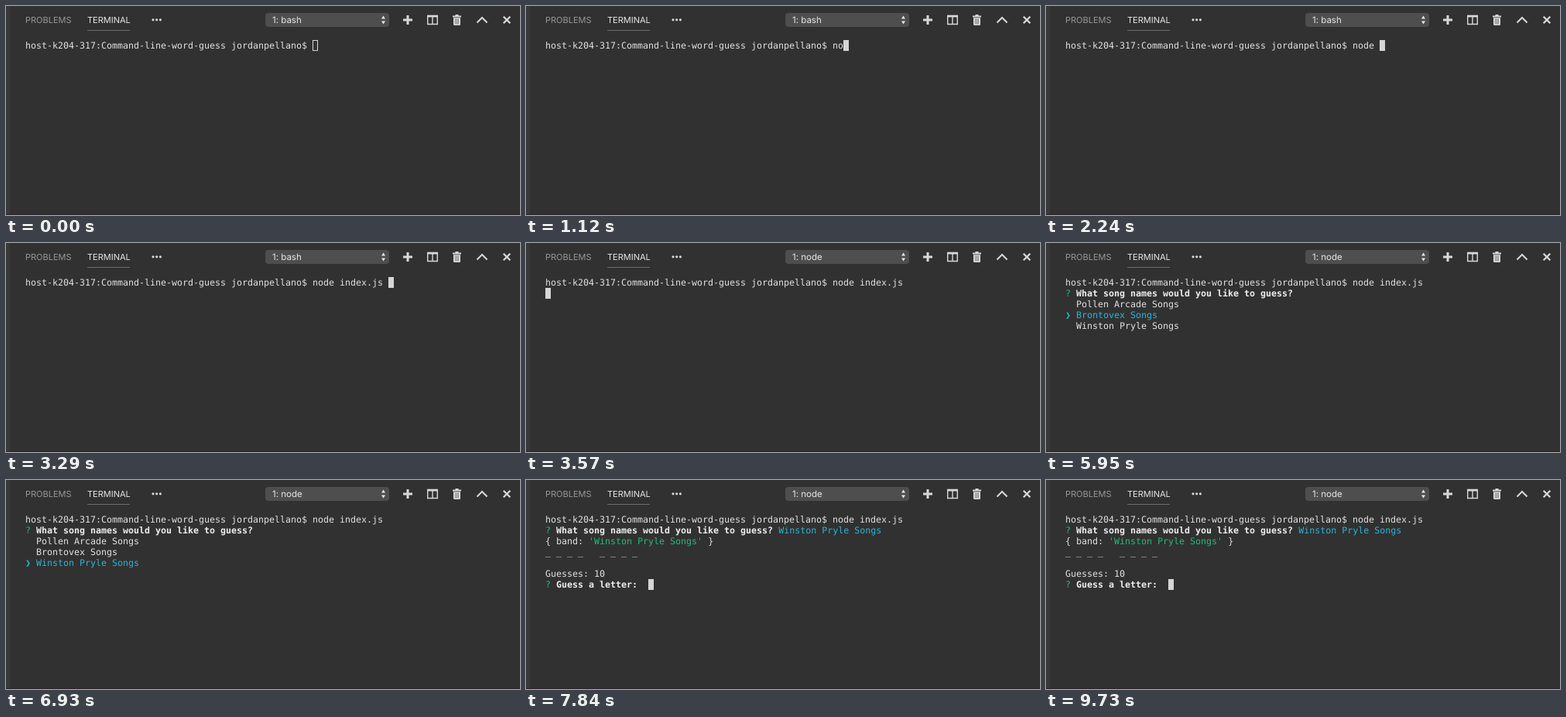
An HTML page that plays this animation: 664x270 px, repeating every 9870 ms.

```html
<!DOCTYPE html>
<html lang="en">
<head>
<meta charset="utf-8">
<title>Terminal word guess</title>
<style>
  html, body { margin: 0; width: 100%; height: 100%; overflow: hidden; background: #313131; }
  svg { display: block; }
  text { white-space: pre; text-rendering: geometricPrecision; }
  .ui { font: 11px Inter, sans-serif; fill: #e7e7e7; }
  #shell { font-size: 11.5px; }
  #term { font: 11.64px "DejaVu Sans Mono", monospace; }
  .icon { fill: none; stroke: #d8d8d8; stroke-width: 2; }
</style>
</head>
<body>
<svg width="664" height="270" viewBox="0 0 664 270">
  <rect width="664" height="270" fill="#313131"/>
  <rect width="5" height="270" fill="#393939"/>
  <rect y="269" width="664" height="1" fill="#2b222a"/>

  <text class="ui" x="25" y="22" style="fill:#989898">PROBLEMS</text>
  <text class="ui" x="105" y="22">TERMINAL</text>
  <path d="M105 31.5H160" stroke="#6c6c6c"/>
  <g fill="#d8d8d8">
    <circle cx="190" cy="17.8" r="1.6"/>
    <circle cx="194.7" cy="17.8" r="1.6"/>
    <circle cx="199.4" cy="17.8" r="1.6"/>
  </g>

  <rect x="335" y="9" width="160" height="18" rx="4" fill="#4e4e4e"/>
  <text class="ui" id="shell" x="344" y="22"></text>
  <path d="M485 16.5l2.5-4 2.5 4zM485 19.5l2.5 4 2.5-4z" fill="#e7e7e7"/>

  <g class="icon">
    <path d="M513 18h12M519 12v12" stroke-width="3"/>
    <path d="M544.7 13.5h12.6v10h-12.6zM551 13v11" stroke-width="1.4"/>
    <path d="M544 13h14" stroke-width="2.6"/>
    <path d="M577 13.5h11M580.5 12h4" stroke-width="1.8"/>
    <path d="M578 15.2h9v8.3q0 1.5-1.5 1.5h-6q-1.5 0-1.5-1.5z" fill="#d8d8d8" stroke="none"/>
    <path d="M580.6 16.5v7M582.5 16.5v7M584.4 16.5v7" stroke="#6a6a6a" stroke-width=".8"/>
    <path d="M608.5 21.5l6.5-6.5 6.5 6.5"/>
    <path d="M642.7 13.7l8.6 8.6M651.3 13.7l-8.6 8.6" stroke-width="2.3"/>
  </g>

  <g id="term"></g>
</svg>
<script>
const LOOP = 9870, CELL = 7.008, LINE = 14, LEFT = 25, TOP = 44;
const TEXT = '#e2e2e2', BOLD = '#eeeeee', GREEN = '#22bb7c', CYAN = '#2bb5d8', GREY = '#808080';
const PROMPT = 'host-k204-317:Command-line-word-guess jordanpellano$ ';
const COMMAND = 'node index.js ';
const QUESTION = 'What song names would you like to guess?';
const CHOICES = ['Pollen Arcade Songs', 'Brontovex Songs', 'Winston Pryle Songs'];
// [time, characters of the command typed by then]
const TYPING = [[0, 0], [980, 1], [1120, 2], [1260, 3], [1330, 4], [2240, 5], [2590, 6], [2730, 14]];

const term = document.getElementById('term');
const shell = document.getElementById('shell');

function put(row, col, str, color = TEXT, weight = 400) {
  return `<text x="${LEFT + col * CELL}" y="${TOP + 11 + row * LINE}" fill="${color}" font-weight="${weight}">${str}</text>`;
}

function cursor(row, col, filled = true) {
  const x = Math.floor(LEFT + col * CELL), y = TOP + row * LINE;
  return filled
    ? `<rect x="${x}" y="${y}" width="7" height="14" fill="#d6d6d6"/>`
    : `<rect x="${x + .5}" y="${y + .5}" width="6" height="13" fill="none" stroke="#d6d6d6"/>`;
}

function ask(row, str) {
  return put(row, 0, '?', GREEN) + put(row, 2, str, BOLD, 700);
}

function menu(t) {
  const chosen = t < 5950 ? 0 : t < 6930 ? 1 : 2;
  let out = ask(1, QUESTION);
  if (!chosen) out += put(1, 43, '(Use arrow keys)', GREY);
  CHOICES.forEach((name, i) => {
    const on = i === chosen;
    if (on) out += put(2 + i, 0, '❯', CYAN);
    out += put(2 + i, 2, name, on ? CYAN : TEXT);
  });
  return out;
}

function game() {
  const name = CHOICES[2];
  return ask(1, QUESTION) + put(1, 43, name, CYAN)
    + put(2, 0, '{ band:') + put(2, 8, `'${name}'`, GREEN) + put(2, 10 + name.length, ' }')
    + put(3, 0, '_ _ _ _   _ _ _ _')
    + put(5, 0, 'Guesses: 10')
    + ask(6, 'Guess a letter:') + cursor(6, 19);
}

function screen(t) {
  const typed = TYPING.filter(([at]) => at <= t).pop()[1];
  const line = PROMPT + COMMAND.slice(0, typed);
  let out = put(0, 0, line);
  if (t < 3500) out += cursor(0, line.length, t >= 420);
  else if (t < 3710) out += cursor(1, 0);
  else out += t < 7840 ? menu(t) : game();
  return out;
}

let shown;
function draw(now) {
  const t = now % LOOP;
  const markup = screen(t);
  if (markup !== shown) term.innerHTML = shown = markup;
  shell.textContent = t < 3570 ? '1: bash' : '1: node';
  requestAnimationFrame(draw);
}
draw(performance.now());
</script>
</body>
</html>
```
